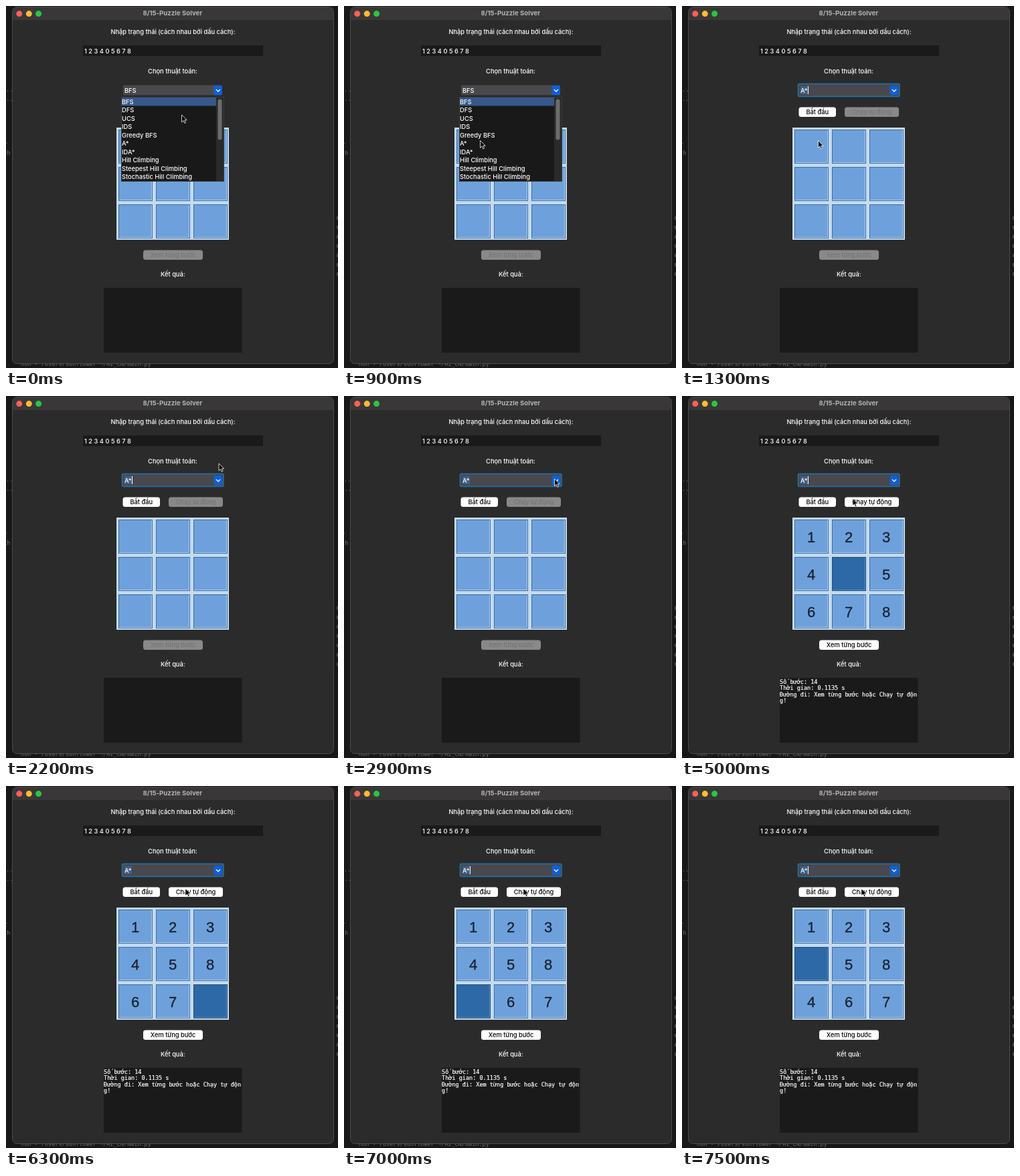
Animation, 496 px wide and 542 px high, one loop 8000 ms. Source, as an HTML page:

```html
<!DOCTYPE html>
<html lang="vi">
<head>
<meta charset="utf-8">
<title>8/15-Puzzle Solver</title>
<style>
  html, body { margin: 0; width: 100%; height: 100%; overflow: hidden; background: #181818; }
  svg { display: block; }
  text { font: 500 9.3px Inter, "Open Sans", sans-serif; font-variant-ligatures: no-contextual; fill: #fff; white-space: pre; }
  .mid { text-anchor: middle; }
  .title { font-size: 9.65px; font-weight: 700; fill: #b4b4b4; }
  .mono { font: 8.53px "DejaVu Sans Mono", monospace; stroke: #fff; stroke-width: .2; }
  .back { font: 8.53px "DejaVu Sans Mono", monospace; fill: #6c6c6c; }
  .well { fill: #1a1a1a; }
  .button rect { fill: #fff; }
  .button text { fill: #000; }
  .button.off rect { fill: #898989; }
  .button.off text { fill: #757575; }
  .tile .face { fill: #6ea1dc; stroke: #3c6c9f; }
  .tile .rim { fill: none; stroke: #b0cfef; }
  .tile text { font: 22px "Liberation Sans", Arial, sans-serif; fill: #18212e; stroke: #18212e; stroke-width: .3; }
  .blank .face { fill: #2d69a6; stroke: #1f4c7a; }
  .blank .rim { stroke: #5c8fc0; }
</style>
</head>
<body>
<svg id="stage" width="496" height="542" viewBox="0 0 496 542">
  <rect width="496" height="542" fill="#181818"/>
  <text class="back" x="0" y="128">...</text>
  <text class="back" x="-5" y="142">i...</text>
  <text class="back" x="-2" y="208">-</text>
  <text class="back" x="-4" y="223">ch</text>
  <text class="back" x="22" y="538.5">non - /Users/sunflower ~/AI_CN/main.py</text>
  <path d="M495 315V408" stroke="#777" stroke-dasharray="5 9"/>
  <rect x="9.5" y="1.5" width="480" height="534" rx="7" fill="#2b2b2b" stroke="#4c4c4c"/>
  <path d="M10 21V9Q10 2 17 2H482Q489 2 489 9V21Z" fill="#393738"/>
  <circle cx="19.8" cy="11.6" r="4.5" fill="#ff5f57"/>
  <circle cx="34.3" cy="11.6" r="4.5" fill="#febc2e"/>
  <circle cx="48.6" cy="11.6" r="4.5" fill="#28c840"/>
  <text class="mid title" x="248.8" y="13.500">8/15-Puzzle Solver</text>
  <text class="mid" x="249.5" y="42">Nhập trạng thái (cách nhau bởi dấu cách):</text>
  <rect class="well" x="115" y="59" width="269" height="16"/>
  <text x="117" y="70.5">1 2 3 4 0 5 6 7 8</text>
  <text class="mid" x="249" y="101">Chọn thuật toán:</text>
  <text class="mid" x="249.300" y="405">Kết quả:</text>
  <rect class="well" x="146" y="422" width="206.500" height="97"/>
  <g id="result"></g>
  <g id="buttons"></g>
  <rect x="165" y="182" width="168" height="168" fill="#c3daf1"/>
  <g id="board"></g>

  <rect x="175" y="118.500" width="148" height="15" rx="2" fill="#49494d"/>
  <rect id="ring" x="173.500" y="116.500" width="151.500" height="19" rx="2" fill="#49484d" stroke="#1c74b0" stroke-width="1.500"/>
  <rect x="310.500" y="119" width="12.500" height="14.500" rx="3" fill="#0f5fd9"/>
  <path d="M314 125l3 3 3-3" fill="none" stroke="#fff" stroke-width="1.300"/>
  <rect id="picked" x="177" y="120" width="11" height="12" fill="#3f5f86"/>
  <text id="choice" x="177" y="129.500"></text>
  <rect id="caret" x="188" y="120" width="1" height="12" fill="#fff"/>

  <g id="menu">
    <rect x="172.500" y="136.500" width="153" height="126" fill="#191919" stroke="#3c3c3c"/>
    <rect x="173" y="137" width="141" height="12.500" fill="#36588a"/>
    <rect x="314" y="137" width="11" height="125" fill="#2a2a2a"/>
    <rect x="316.500" y="139.500" width="6" height="61" rx="3" fill="#6c6c6c"/>
  </g>
  <path id="mouse" d="M0 0V10.800L2.500 8.500 4.200 12.400 6 11.600 4.300 7.800H7.700Z" fill="#000" stroke="#fff" stroke-width=".8"/>
</svg>
<script>
const $ = id => document.getElementById(id);

function add(parent, tag, attrs, text = '') {
  const el = document.createElementNS('http://www.w3.org/2000/svg', tag);
  for (const key in attrs) el.setAttribute(key, attrs[key]);
  el.textContent = text;
  return parent.appendChild(el);
}

function addButton(x, y, width, label) {
  const g = add($('buttons'), 'g', { class: 'button' });
  add(g, 'rect', { x, y, width, height: 14.5, rx: 3.5 });
  add(g, 'text', { x: x + width / 2, y: y + 10.3, class: 'mid' }, label);
  return g;
}

addButton(174.5, 151.5, 55.5, 'Bắt đầu');
const gated = [
  addButton(243, 151.5, 81, 'Chạy tự động'),
  addButton(205, 365.5, 89, 'Xem từng bước')
];

['Số bước: 14', 'Thời gian: 0.1135 s', 'Đường đi: Xem từng bước hoặc Chạy tự độn', 'g!']
  .forEach((line, i) => add($('result'), 'text', { class: 'mono', x: 146, y: 430.7 + i * 9.45 }, line));

['BFS', 'DFS', 'UCS', 'IDS', 'Greedy BFS', 'A*', 'IDA*', 'Hill Climbing',
 'Steepest Hill Climbing', 'Stochastic Hill Climbing']
  .forEach((name, i) => add($('menu'), 'text', { x: 173, y: 146.5 + i * 12.5 }, name));

// Ridged tiles: dark outline, light inner edge at the bottom right
const tiles = Array.from({ length: 9 }, (_, i) => {
  const x = 168 + i % 3 * 56, y = 185 + Math.floor(i / 3) * 56;
  const g = add($('board'), 'g', {});
  add(g, 'rect', { class: 'face', x: x + .5, y: y + .5, width: 50, height: 50 });
  add(g, 'path', { class: 'rim', d: `M${x + 1} ${y + 49.5}h48.5v-48.5` });
  const label = add(g, 'text', { class: 'mid', x: x + 25, y: y + 33.5 });
  return { g, label };
});

// [time, board]; 0 is the blank
const boards = [
  [0, '         '], [4200, '123405678'], [5500, '123450678'], [6000, '123458670'],
  [6500, '123458607'], [7000, '123458067'], [7400, '123058467']
];

// [time, x, y] of the pointer tip
const route = [
  [0, 262.5, 163], [300, 322, 128], [600, 270, 244], [750, 192, 215], [900, 203.5, 201.5],
  [1500, 203.5, 201.5], [1800, 184, 165], [2000, 235, 116], [2200, 318, 101], [2400, 314.5, 124],
  [3200, 314.5, 124], [3800, 220, 155.5], [4700, 220, 155.5], [5000, 255, 153.5], [5200, 268, 153.5],
  [8000, 268, 153.5]
];

function pointerAt(t) {
  const i = route.findIndex(p => p[0] > t);
  const [t0, x0, y0] = route[i - 1], [t1, x1, y1] = route[i];
  const k = (t - t0) / (t1 - t0), e = k * k * (3 - 2 * k);
  return [x0 + (x1 - x0) * e, y0 + (y1 - y0) * e];
}

const show = (id, on) => $(id).setAttribute('visibility', on ? 'visible' : 'hidden');

function draw(now) {
  const t = Math.floor(now % 8000 / 100) * 100;
  const closed = t >= 1200, solved = t >= 4200;

  show('menu', !closed);
  show('ring', closed);
  show('picked', closed);
  show('caret', closed && (t - 1200) % 900 < 600);
  show('result', solved);
  $('choice').textContent = closed ? 'A*' : 'BFS';
  gated.forEach(b => b.classList.toggle('off', !solved));

  const board = boards.filter(b => b[0] <= t).pop()[1];
  tiles.forEach(({ g, label }, i) => {
    g.setAttribute('class', board[i] === '0' ? 'tile blank' : 'tile');
    label.textContent = board[i] === '0' ? '' : board[i];
  });

  $('mouse').setAttribute('transform', `translate(${pointerAt(t)})`);
}

const start = performance.now();
function tick() {
  draw(performance.now() - start);
  requestAnimationFrame(tick);
}
tick();
</script>
</body>
</html>
```
